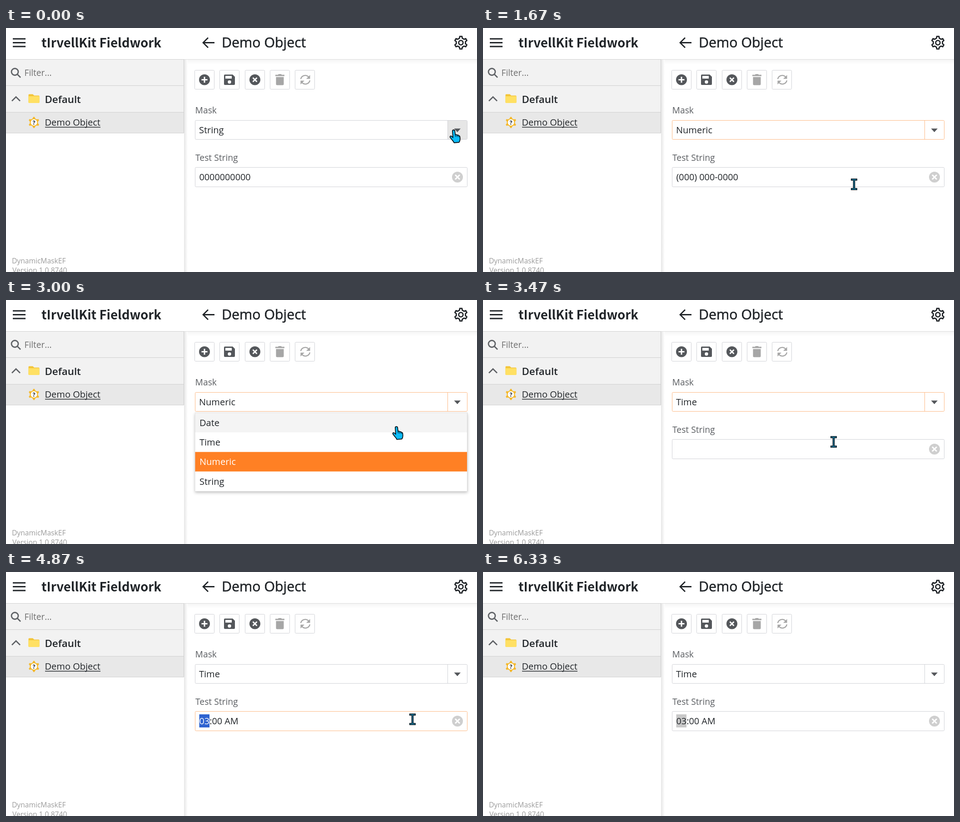
An HTML page for the animation above (6390 ms loop, 1037 by 540 pixels).

```html
<!DOCTYPE html>
<html lang="en">
<head>
<meta charset="utf-8">
<title>Dynamic mask demo</title>
<style>
html, body { margin: 0; width: 100%; height: 100%; overflow: hidden; background: #fff; }
svg { display: block; }
text { font: 20px 'Open Sans', 'Noto Sans', sans-serif; fill: #212529; white-space: pre; }
.brand { font: 700 27.6px 'Noto Sans CJK SC', 'Noto Sans CJK JP', sans-serif; }
.title { font-size: 30.3px; stroke: #212529; stroke-width: .6; }
.group { font-size: 22.3px; font-weight: 600; }
.label { font-size: 19.3px; fill: #5c5f63; }
.hint { font-size: 19.1px; fill: #707070; }
.foot { font-size: 15.6px; fill: #9b9b9b; }
.value { font-size: 19.8px; }
.line { fill: none; stroke: #212529; stroke-width: 2.8; }
.box { fill: #fff; stroke: #d0d1d6; }
.box.focus, .sep.focus { stroke: #fdb984; }
.sep { stroke: #d0d1d6; }
.dark { fill: #54575b; }
.pale { fill: #a6a6a6; }
.cut { fill: none; stroke: #fff; stroke-width: 3; }
.panel { filter: drop-shadow(0 3px 3px rgba(0, 0, 0, .24)); }
</style>
</head>
<body>
<svg id="stage" width="1037" height="540" viewBox="0 0 1037 540">
  <defs>
    <linearGradient id="down" x2="0" y2="1"><stop stop-color="#f5f5f5"/><stop offset="1" stop-color="#fff"/></linearGradient>
    <linearGradient id="side"><stop stop-color="#e6e6e6"/><stop offset="1" stop-color="#fff"/></linearGradient>
  </defs>

  <!-- header -->
  <path class="line" d="M15 24h28M15 32.500h28M15 41h28"/>
  <text class="brand" x="78" y="43">tIrvellKit Fieldwork</text>
  <path class="line" d="M459 32.500H434M445 21.500L434 32.500l11 11"/>
  <text class="title" x="475" y="43">Demo Object</text>
  <path id="cog" class="line" stroke-linejoin="round"/>
  <circle class="line" cx="1001.500" cy="32.500" r="4.800"/>
  <rect x="393" y="70" width="644" height="11" fill="url(#down)"/>
  <rect x="392" y="70" width="8" height="470" fill="url(#side)"/>
  <path d="M0 69.500h1037" stroke="#dcdcdc"/>

  <!-- sidebar -->
  <rect y="70" width="392" height="117" fill="#f2f2f2"/>
  <rect y="187" width="392" height="45" fill="#e8e8e8"/>
  <path d="M0 69.500h392M391.500 70V232.500H0M0 127.500h392M0 186.500h392" fill="none" stroke="#cfcfcf"/>
  <g class="line" style="stroke:#606367">
    <circle cx="19.500" cy="97" r="7.500"/><path d="M25 102.500l7 7"/><path d="M13 161.500l9-9 9 9"/>
  </g>
  <text class="hint" x="40.600" y="106">Filter...</text>
  <path d="M49.500 148q0-1.500 1.500-1.500h8l3 3h10q1.500 0 1.500 1.500v14H49.500z" fill="#f3c53a"/>
  <path d="M49.500 151h24v13.500q0 1.500-1.500 1.500H51q-1.500 0-1.500-1.500z" fill="#ffe063"/>
  <text class="group" x="85.500" y="166">Default</text>
  <path id="sun" fill="#f4b92e"/>
  <circle cx="61.500" cy="209" r="7" fill="#fff"/>
  <text x="61.500" y="213.500" text-anchor="middle" style="font-size:12px;font-weight:700">?</text>
  <text x="85.500" y="216">Demo Object</text>
  <path d="M86 219.500h122" stroke="#212529" stroke-width="1.500"/>
  <text class="foot" x="13" y="521">DynamicMaskEF</text>
  <text class="foot" x="14" y="542">Version 1.0.8740</text>

  <!-- toolbar -->
  <g id="buttons"></g>
  <circle class="dark" cx="437" cy="114.500" r="12"/><path class="cut" d="M437 108v13M430.500 114.500h13"/>
  <path class="dark" d="M482 103h17l5 5v16q0 2-2 2h-20q-2 0-2-2v-19q0-2 2-2z"/>
  <path fill="#fff" d="M483 106h14v6h-14z"/><circle cx="492" cy="119.500" r="3.700" fill="#fff"/>
  <circle class="dark" cx="548" cy="114.500" r="12"/><path class="cut" d="M543.500 110l9 9m0-9l-9 9"/>
  <path class="pale" d="M593 103.500h6l1-1.500h6l1 1.500h6v3h-20zM594.500 108.500h17V124q0 2.500-2.500 2.500h-12q-2.500 0-2.500-2.500z"/>
  <path fill="none" stroke="#a6a6a6" stroke-width="2.400" d="M649 113a10 10 0 0 1 17-5M669 116a10 10 0 0 1-17 5"/>
  <path class="pale" d="M669.500 104v8.500H661zM648.500 125v-8.500h8.500z"/>

  <!-- form -->
  <text class="label" x="416.500" y="189">Mask</text>
  <rect id="mask" class="box" x="416.500" y="204.500" width="599" height="42" rx="2"/>
  <rect id="drop" x="973" y="205" width="42" height="41" fill="#e6e6e6"/>
  <path id="sep" class="sep" d="M972.500 205v41"/>
  <path class="dark" d="M986.500 222.500h14.500l-7.250 8z"/>
  <text id="maskText" x="425" y="233"></text>
  <text class="label" x="417" y="294">Test String</text>
  <rect id="test" class="box" x="416.500" y="308.500" width="599" height="43" rx="2"/>
  <rect id="mark" x="425.500" y="315" width="22.500" height="29"/>
  <text class="value" x="425.500" y="337"><tspan id="hours"></tspan><tspan id="rest"></tspan></text>
  <path id="caret" d="M426.500 318v24" stroke="#212529" stroke-width="1.500"/>
  <circle cx="994" cy="330" r="12" fill="#cfcfcf"/><path class="cut" d="M989 325l10 10m0-10l-10 10"/>

  <g id="list">
    <rect class="panel" x="416.500" y="249.500" width="599" height="173.500" fill="#fff" stroke="#d8d8d8"/>
  </g>

  <!-- pointers, each with its hot spot at 0,0 -->
  <g id="pointer" fill="#0cbcfa" stroke="#07151c" stroke-width="1.800" stroke-linejoin="round">
    <g id="hand">
      <path d="M-3 3Q-3 .5-.5 .5T2.200 3L3.200 11Q5.500 9.800 7 12Q9.500 11 10.800 13.500Q13.300 13 13.500 16.500L13.800 21Q13.800 25 11.500 28L.5 29Q-1 25.500-4 22.500L-8.200 17Q-9 14.500-7 14Q-5 14-2 17.500Z"/>
      <path d="M3.200 11l.5 4.500M7 12l.5 4M10.800 13.500l.3 3" fill="none" stroke-width="1.300"/>
    </g>
    <g id="beam" fill="none">
      <path d="M-7-10.500h14M0-10.500v21M-7 10.500h14" stroke-width="4.600"/>
      <path d="M-5.500-10.500h11M0-10.500v21M-5.500 10.500h11" stroke="#1786b0" stroke-width="1.500"/>
    </g>
    <path id="arrow" d="M0 1V21.500L4.700 17.200 8 25 11.800 23.300 8.500 15.800H15.500Z"/>
  </g>
</svg>
<script>
const LOOP = 6390, TICK = 1000 / 15;
const $ = id => document.getElementById(id);
const add = (parent, tag, attrs) => {
  const el = document.createElementNS('http://www.w3.org/2000/svg', tag);
  for (const name in attrs) el.setAttribute(name, attrs[name]);
  return parent.appendChild(el);
};

// Toothed wheel: base and tip half-widths are fractions of the tooth pitch.
function gear(cx, cy, teeth, inner, outer, base, tip) {
  const pitch = 2 * Math.PI / teeth, points = [];
  for (let i = 0; i < teeth; i++)
    for (const [r, w] of [[inner, -base], [outer, -tip], [outer, tip], [inner, base]]) {
      const a = (i + w) * pitch - Math.PI / 2;
      points.push((cx + r * Math.cos(a)).toFixed(2) + ' ' + (cy + r * Math.sin(a)).toFixed(2));
    }
  return 'M' + points.join('L') + 'Z';
}
$('cog').setAttribute('d', gear(1001.5, 32.5, 6, 10.4, 14, .28, .17));
$('sun').setAttribute('d', gear(61.5, 209, 6, 9.2, 12.3, .3, .12));

for (let i = 0; i < 5; i++)
  add($('buttons'), 'rect', { class: 'box', x: Math.round(i * 55.3) + 415.5, y: 93.5, width: 43, height: 42, rx: 2 });

const ITEMS = ['Date', 'Time', 'Numeric', 'String'], TOP = 249.5, ROW = 43.4;
const rows = ITEMS.map((name, i) => {
  const bar = add($('list'), 'rect', { x: 416.5, y: TOP + i * ROW, width: 598.5, height: ROW });
  const label = add($('list'), 'text', { x: 426, y: TOP + i * ROW + 29 });
  label.textContent = name;
  return { bar, label };
});

// Pointer path: tick, x, y
const PATH = [
  [0, 986, 225], [3, 986, 225], [5, 990, 225], [12, 990, 225], [15, 903, 271], [22, 817, 346],
  [26, 817, 346], [39, 992, 228], [42, 992, 228], [47, 772, 314], [52, 772, 314], [61, 915, 330],
  [66, 922, 338], [68, 922, 338], [73, 895, 326], [75, 800, 358], [78, 681, 330], [80, 620, 296],
  [88, 299, 450]
];
function pointerAt(k) {
  const i = PATH.findIndex(p => p[0] > k);
  if (i < 0) return PATH[PATH.length - 1].slice(1);
  const [k0, x0, y0] = PATH[i - 1], [k1, x1, y1] = PATH[i], u = (k - k0) / (k1 - k0);
  return [x0 + (x1 - x0) * u, y0 + (y1 - y0) * u];
}

const within = (k, from, to) => k >= from && k < to;
const show = (id, on) => { $(id).style.display = on ? '' : 'none'; };
const focus = (id, on) => $(id).classList.toggle('focus', on);

function draw(k) {
  const [x, y] = pointerAt(k);
  const open = within(k, 9, 24) || within(k, 41, 52);
  const inX = within(x, 416, 1016);
  const overList = open && inX && within(y, TOP, TOP + 4 * ROW);
  const overMask = inX && within(y, 204, 247), overTest = inX && within(y, 308, 352);
  const overDrop = overMask && x > 972;

  const kind = overList || overDrop ? 'hand' : overMask || overTest ? 'beam' : 'arrow';
  for (const id of ['hand', 'beam', 'arrow']) show(id, id === kind);
  show('pointer', k < 89);
  $('pointer').setAttribute('transform', `translate(${x.toFixed(1)} ${y.toFixed(1)})`);

  const chosen = k < 24 ? 3 : k < 52 ? 2 : 1;
  const maskFocus = within(k, 9, 64) && k !== 23 && !within(k, 50, 52);
  $('maskText').textContent = ITEMS[chosen];
  focus('mask', maskFocus);
  focus('sep', maskFocus);
  show('drop', overDrop);

  show('list', open);
  $('list').setAttribute('opacity', k === 9 || k === 41 ? .5 : 1);
  const hovered = overList ? Math.floor((y - TOP) / ROW) : -1;
  rows.forEach(({ bar, label }, i) => {
    bar.style.fill = i === chosen ? '#ff8024' : i === hovered ? '#f4f4f4' : '#fff';
    label.style.fill = i === chosen ? '#fff' : '';
  });

  const timed = k >= 69, active = within(k, 64, 95);
  focus('test', active);
  show('caret', within(k, 64, 69));
  show('mark', timed);
  $('mark').style.fill = active ? '#2f63d0' : '#c8c8c8';
  $('hours').textContent = timed ? '03' : '';
  $('hours').style.fill = active ? '#fff' : '#212529';
  $('rest').textContent = timed ? ':00 AM' : k < 25 ? '0000000000' : k < 52 ? '(000) 000-0000' : '';
}

let start, last = -1;
function frame(now) {
  start ??= now;
  const k = Math.floor(((now - start) % LOOP + 4) / TICK);
  if (k !== last) draw(last = k);
  requestAnimationFrame(frame);
}
draw(0);
requestAnimationFrame(frame);
</script>
</body>
</html>
```
